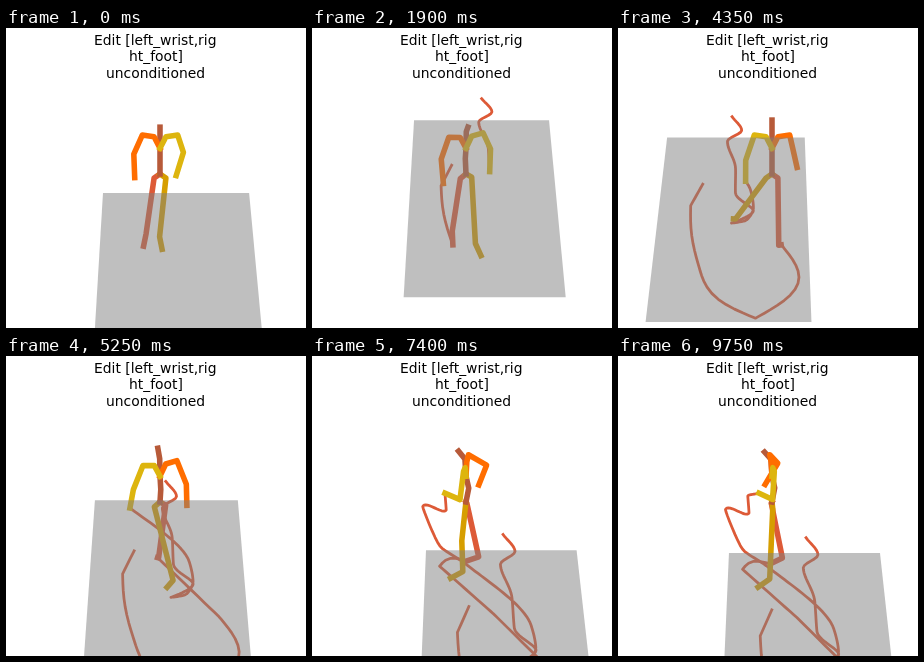
Write an HTML page with a canvas that moves like this. It is 300 px wide and 300 px high and loops after 9800 ms.

```html
<!DOCTYPE html>
<html lang="en">
<head>
<meta charset="utf-8">
<title>Motion edit</title>
<style>
  html, body { margin: 0; width: 100%; height: 100%; overflow: hidden; background: #fff; }
  canvas { display: block; width: 300px; height: 300px; }
</style>
</head>
<body>
<canvas id="stage" width="300" height="300"></canvas>
<script>
const ctx = document.getElementById('stage').getContext('2d');
const LOOP = 9800, STEP = 0.05;
const FLOOR_W = 0.751, FLOOR_D = 1.74, GROUND = -0.5;
const LEFT = 1, RIGHT = -1;

// Key points on the floor: time, across, depth.
const walk = [
  [0, .293, .503], [.95, .225, .9], [1.9, .289, 1.298], [3, .512, 1.602], [4.05, .6, 1.22],
  [5.25, .342, .719], [6.2, .1165, .344], [7.4, .1995, .219], [9.75, .214, .191]
];
const hand = [
  [0, .37, .503], [.4, .421, .65], [.7, .353, .76], [1.4, .398, 1.033], [1.9, .402, 1.26],
  [2.4, .487, 1.42], [3, .389, 1.527], [3.45, .45, 1.508], [3.75, .487, 1.4], [4.15, .473, 1.24],
  [5.25, .2, .76], [5.85, .07, .59], [6.2, 0, .411], [6.9, .107, .348], [7.4, .101, .286],
  [8.8, .153, .258]
];
// Footsteps: lift time, landing time, across, depth, sideways bulge of the swing.
const rightSteps = [
  [0, 0, .213, .506, 0], [.1, .5, .16, .72, 0], [1, 1.6, .225, 1.29, .015],
  [2, 2.65, .497, 1.71, .064], [3.1, 4, .617, 1.09, .14], [4.5, 5.15, .33, .57, 0],
  [5.6, 6.3, .07, .15, 0], [6.9, 7.3, .206, .1, -.05]
];
const leftSteps = [
  [0, 0, .303, .534, 0], [.5, 1.05, .3, .98, 0], [1.4, 1.85, .361, 1.385, 0],
  [2.55, 3.2, .626, 1.46, 0], [3.7, 4.4, .376, .839, 0], [5.25, 5.8, .073, .383, 0],
  [6.7, 7.1, .125, .258, 0], [8, 8.5, .147, .311, 0]
];

const add = (a, b, k = 1) => a.map((x, i) => x + b[i] * k);
const mix = (a, b) => a.map((x, i) => (x + b[i]) / 2);
function ease(from, to, t) {
  const s = Math.min(1, Math.max(0, (t - from) / (to - from)));
  return s * s * (3 - 2 * s);
}

// Smooth interpolation that does not overshoot its keys.
function along(track, t) {
  const last = track.length - 1;
  if (t >= track[last][0]) return track[last].slice(1);
  const i = track.findIndex(row => row[0] > t) - 1;
  const span = track[i + 1][0] - track[i][0], s = (t - track[i][0]) / span, r = 1 - s;
  return [1, 2].map(n => {
    const slope = j => (track[j + 1][n] - track[j][n]) / (track[j + 1][0] - track[j][0]);
    const tangent = j => {
      if (j === 0) return slope(0);
      if (j === last) return slope(last - 1);
      const a = slope(j - 1), b = slope(j);
      return a * b > 0 ? 2 * a * b / (a + b) : 0;
    };
    return track[i][n] * r * r * (1 + 2 * s) + track[i + 1][n] * s * s * (3 - 2 * s) +
      span * s * r * (tangent(i) * r - tangent(i + 1) * s);
  });
}

function toeAt(steps, t) {
  const i = steps.findLastIndex(step => t >= step[0]);
  const [lift, land, u, v, bulge] = steps[i];
  if (t >= land) return [u, v, GROUND];
  const [, , u0, v0] = steps[i - 1];
  const s = ease(lift, land, t), du = u - u0, dv = v - v0;
  const side = bulge * Math.sin(Math.PI * s) / Math.hypot(du, dv);
  return [u0 + du * s - dv * side, v0 + dv * s + du * side, GROUND];
}

const handRaise = t => ease(5.75, 6.2, t);
function handAt(t) {
  const dip = ease(6.3, 6.8, t) - ease(6.9, 7.4, t);
  return [...along(hand, t), -0.105 + 0.095 * handRaise(t) - 0.055 * dip];
}

const heading = t =>
  Math.PI * ease(1.6, 3.3, t) + 1.35 * ease(4.8, 6.3, t) + 0.35 * ease(6.3, 9.8, t);

// Middle joint of a limb with two bones of equal length.
function bend(a, b, bone, pole) {
  const half = Math.hypot(...add(a, b, -1)) / 2;
  return add(mix(a, b), pole, Math.sqrt(Math.max(0, bone * bone - half * half)));
}

function skeleton(t, root) {
  const angle = heading(t), sin = Math.sin(angle), cos = Math.cos(angle);
  const turn = (side, forward, up) => [side * cos + forward * sin, forward * cos - side * sin, up];
  const joint = (side, forward, up) => add([...root, 0], turn(side, forward, up));
  const pelvis = joint(0, 0, -0.096), chest = joint(0, 0, 0.044);

  const leg = (side, steps) => {
    const toe = toeAt(steps, t), hip = joint(side * 0.028, 0, -0.118);
    const behind = Math.max(0, (root[0] - toe[0]) * sin + (root[1] - toe[1]) * cos);
    const ankle = add(toe, turn(side * -0.012, -0.058, 0.035 + 0.3 * behind));
    return [pelvis, hip, bend(hip, ankle, 0.174, turn(side * 0.3, 0.9, 0)), ankle, toe];
  };
  const arm = (side, wrist, raise) => {
    const shoulder = joint(side * 0.083, 0, 0.114);
    const elbow = bend(shoulder, wrist, 0.118, turn(side * 0.7 * (1 - raise), -0.7 + 0.4 * raise, -raise));
    return [chest, joint(side * 0.028, 0, 0.105), shoulder, elbow, wrist];
  };

  const ahead = toeAt(leftSteps, t);
  const swing = 0.35 * ((ahead[0] - root[0]) * sin + (ahead[1] - root[1]) * cos) * (1 - handRaise(t));
  const rightHand = joint(-0.12 + 0.02 * handRaise(t),
    swing - 0.07 * ease(5.6, 6.2, t) + 0.09 * ease(6.4, 9.5, t), -0.11 + 0.055 * ease(6.3, 7.3, t));
  return [
    ['#dd5a37', leg(RIGHT, rightSteps)],
    ['#d69e00', leg(LEFT, leftSteps)],
    ['#b75a39', [pelvis, joint(0, -0.013, -0.02), chest, joint(0, 0.005, 0.135), joint(0, 0.035, 0.175)]],
    ['#ff6d00', arm(RIGHT, rightHand, 0)],
    ['#ddb50e', arm(LEFT, handAt(t), handRaise(t))]
  ];
}

// Perspective camera 30 degrees above the horizon, following the body.
function project([u, v, height], root) {
  const z = v - root[1] - 1 / 6;
  const scale = 1621 / (7.5 - 0.5 * height - 0.866 * z);
  return [154 + (u - root[0]) * scale, 146 - (0.866 * height - 0.5 * z) * scale];
}

function draw(t) {
  const root = along(walk, t);
  const trace = points => {
    ctx.beginPath();
    points.forEach(p => ctx.lineTo(...project(p, root)));
  };
  const stroke = (points, color, width) => {
    trace(points);
    ctx.strokeStyle = color;
    ctx.lineWidth = width;
    ctx.stroke();
  };

  ctx.clearRect(0, 0, 300, 300);
  ctx.lineCap = 'square';
  ctx.lineJoin = 'round';
  const times = Array.from({ length: Math.round(t / STEP) + 1 }, (_, i) => i * STEP);
  stroke(times.map(handAt), '#dd5a37', 2.78);
  stroke(times.map(time => toeAt(rightSteps, time)), '#dd5a37', 2.78);
  for (const [color, chain] of skeleton(t, root)) stroke(chain, color, 5.56);

  trace([[0, 0, GROUND], [FLOOR_W, 0, GROUND], [FLOOR_W, FLOOR_D, GROUND], [0, FLOOR_D, GROUND]]);
  ctx.fillStyle = 'rgba(128, 128, 128, 0.5)';
  ctx.fill();

  ctx.fillStyle = '#000';
  ctx.font = '13.89px "DejaVu Sans", sans-serif';
  ['Edit [left_wrist,rig', 'ht_foot]', 'unconditioned'].forEach((line, i) => {
    const x = Math.floor(150 - ctx.measureText(line).width / 2);
    ctx.fillText(line, x, Math.floor(17 + 16.5 * i));
  });
}

function tick() {
  draw(Math.floor(performance.now() % LOOP / 50) * STEP);
  requestAnimationFrame(tick);
}
tick();
</script>
</body>
</html>
```
